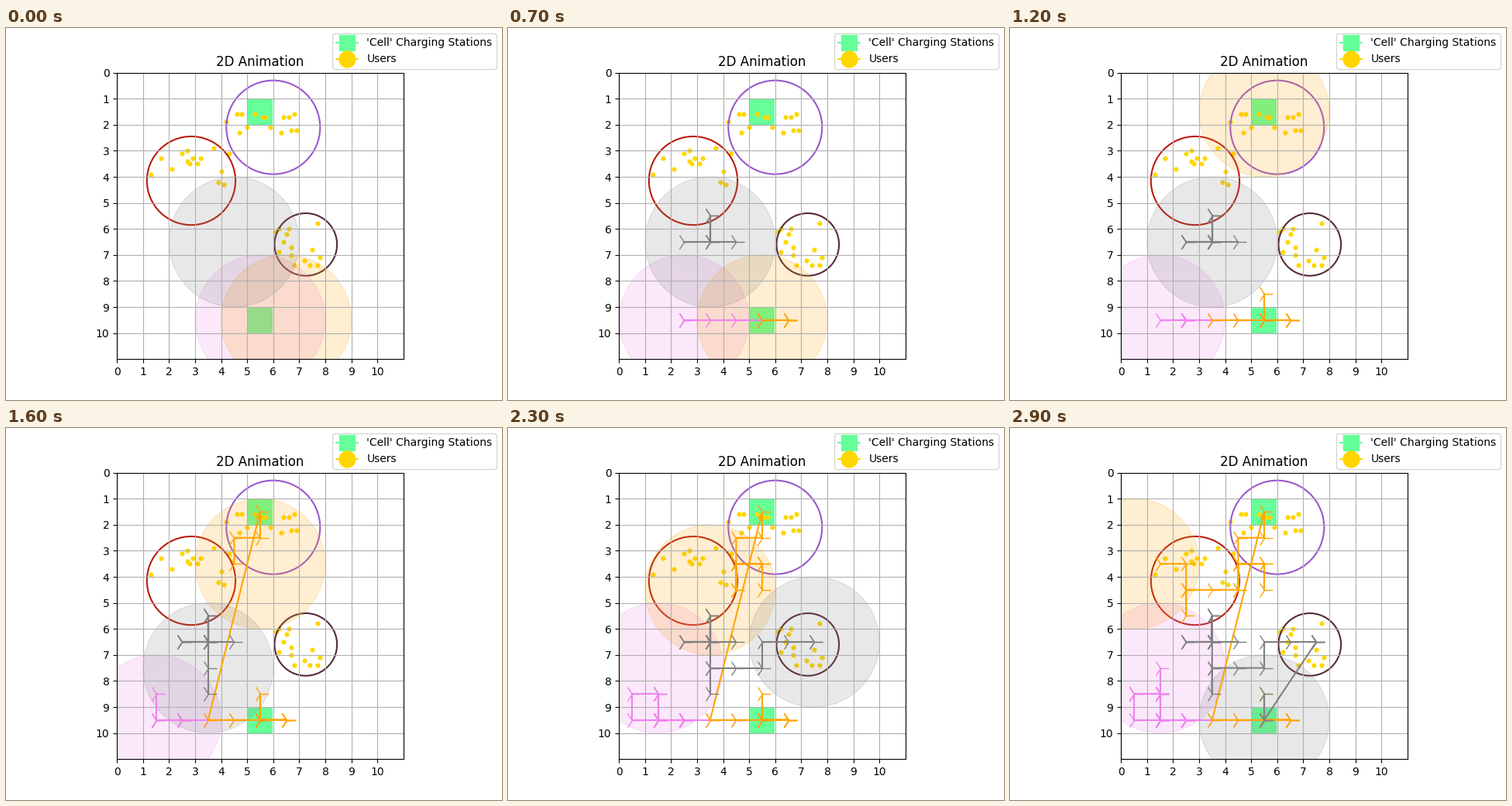
These frames come from a looping animation (640 px wide and 480 px high, 3000 ms). A matplotlib script:

```python
import random

import matplotlib.pyplot as plt
from matplotlib.animation import FuncAnimation
from matplotlib.lines import Line2D
from matplotlib.patches import Circle, Rectangle

FRAMES, INTERVAL = 30, 100
SIZE = 11
REACH = 2.5
USERS_PER_CLUSTER = 15
GREEN, GOLD = "#66ff99", "gold"

STATIONS = {"A": (5, 1), "B": (5, 9)}
STEPS = {"L": (-1, 0), "R": (1, 0), "U": (0, -1), "D": (0, 1), "S": (0, 0)}

# colour, start cell, moves (A and B jump to a charging station)
DRONES = [
    ("violet", (5, 9), "SLLLSSSSSLRLSSUDSUDLURUDSLSRU"),
    ("orange", (6, 9), "SSLSRSLUDLLADLDRDULDUDLLDUULL"),
    ("gray", (4, 6), "LUDUDLRLSRUDSDDURRURRSSSBSSUD"),
]

# centre, radius, colour, x range and y range of the users
CLUSTERS = [
    ((6, 2.1), 1.8, "#9a58cc", (4, 7.2), (1.5, 2.4)),
    ((2.85, 4.15), 1.7, "#b91c0c", (1.2, 4.3), (2.8, 4.5)),
    ((7.25, 6.6), 1.2, "#562a38", (6.1, 7.9), (5.6, 7.5)),
]


def walk(start, moves):
    """Cell centres visited by a drone, one per frame."""
    cells = [start]
    for move in moves:
        if move in STATIONS:
            cells.append(STATIONS[move])
        else:
            (x, y), (dx, dy) = cells[-1], STEPS[move]
            cells.append((x + dx, y + dy))
    return [(x + 0.5, y + 0.5) for x, y in cells]


def scatter_users(rng, x_range, y_range):
    """Random users on a grid of tenths."""
    return [(round(rng.uniform(*x_range), 1), round(rng.uniform(*y_range), 1))
            for _ in range(USERS_PER_CLUSTER)]


fig, ax = plt.subplots(figsize=(6.4, 4.8), dpi=100)
ax.set_aspect("equal")
ax.set_xlim(0, SIZE)
ax.set_ylim(SIZE, 0)
ax.set_xticks(range(SIZE))
ax.set_yticks(range(SIZE))
ax.grid(True)
ax.set_title("2D Animation")

for corner in STATIONS.values():
    ax.add_patch(Rectangle(corner, 0.97, 1, facecolor=GREEN, edgecolor="none"))

rng = random.Random(4)
for center, radius, color, x_range, y_range in CLUSTERS:
    users = scatter_users(rng, x_range, y_range)
    ax.scatter(*zip(*users), s=20, color=GOLD, linewidths=0)
    ax.add_patch(Circle(center, radius, fill=False, edgecolor=color, lw=1.5))

paths, discs, trails = [], [], []
for color, start, moves in DRONES:
    path = walk(start, moves)
    paths.append(path)
    discs.append(ax.add_patch(Circle(path[0], REACH, color=color, alpha=0.18)))
    trails += ax.plot([], [], color=color, marker="4", markersize=16)

fig.legend(handles=[
    Line2D([], [], color=GREEN, marker="s", markersize=15,
           label="'Cell' Charging Stations"),
    Line2D([], [], color=GOLD, marker="o", markersize=15, label="Users"),
], loc="upper right")


def update(i):
    for path, disc, trail in zip(paths, discs, trails):
        disc.center = path[i]
        trail.set_data([x for x, _ in path[:i]], [y for _, y in path[:i]])
    return discs + trails


anim = FuncAnimation(fig, update, frames=FRAMES, interval=INTERVAL,
                     repeat=True, repeat_delay=0, blit=False)
plt.show()
```
